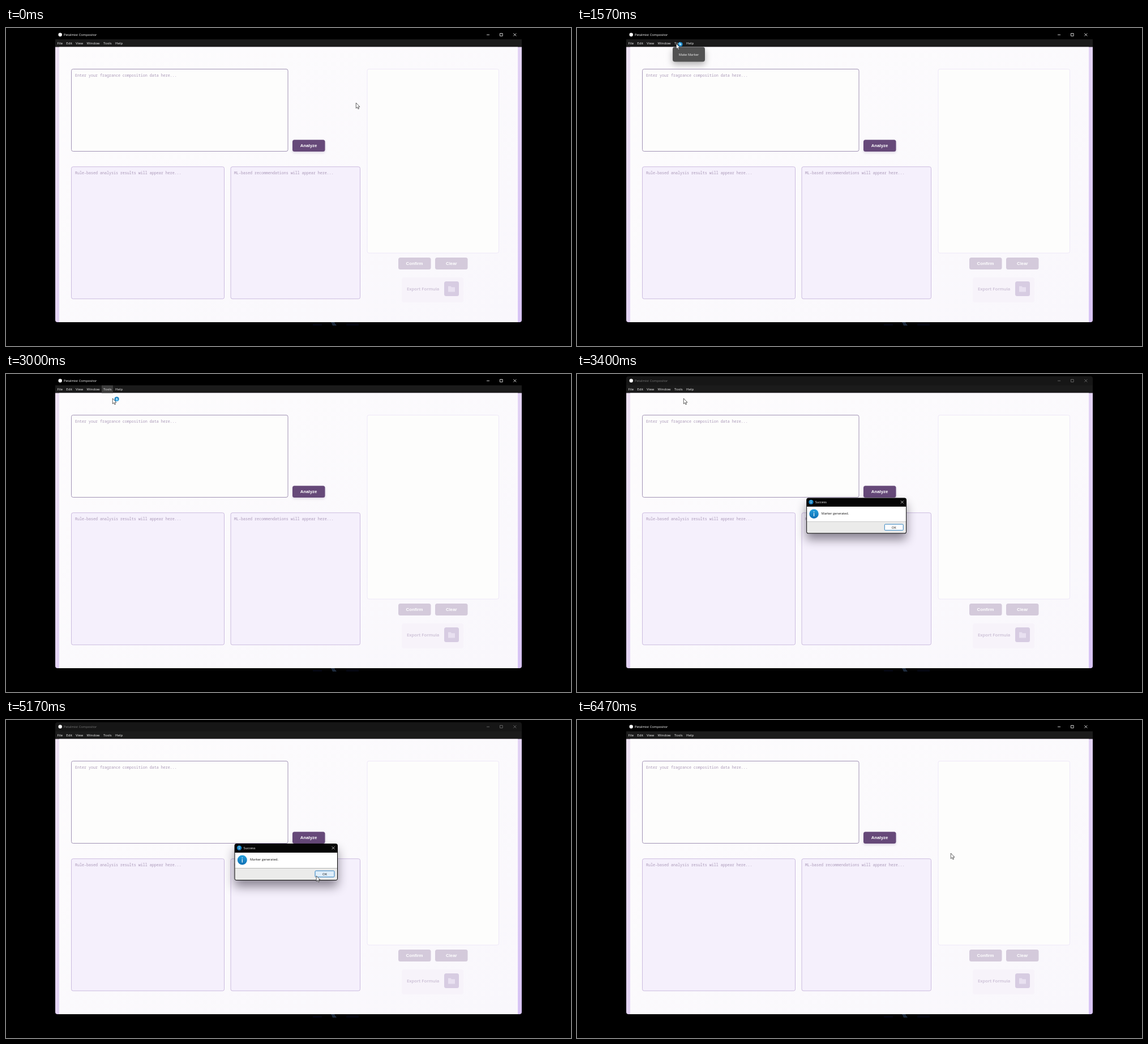
Animation of 998x561 px, one loop 6500 ms. Source, as an HTML page:

```html
<!DOCTYPE html>
<html lang="en">
<head>
<meta charset="utf-8">
<title>Petalmist Compositor</title>
<style>
  html, body { margin: 0; width: 100%; height: 100%; overflow: hidden; background: #000; }
  svg { display: block; width: 100%; height: 100%; }
  text { font-family: "Open Sans", "Noto Sans", sans-serif; font-size: 5.8px; white-space: pre; }
  .menu text { font-size: 6.1px; fill: #f2f2f2; }
  .hint text { font: 6.67px "Noto Sans Mono", "DejaVu Sans Mono", monospace; fill: #aa98b8; }
  .btn text { font: bold 7.8px "Liberation Sans", Arial, sans-serif; fill: #fff; text-anchor: middle; }
  .mid { text-anchor: middle; }
  #analyze { filter: drop-shadow(0 2px 2px rgba(90, 60, 120, .2)); }
  #popup { filter: drop-shadow(0 5px 6px rgba(0, 0, 0, .3)); }
  #dialog { filter: drop-shadow(0 11px 9px rgba(10, 5, 20, .45)); }
</style>
</head>
<body>
<svg viewBox="0 0 998 561">
  <defs>
    <linearGradient id="edge" x2="1" y2="1">
      <stop stop-color="#eee2f4"/><stop offset="1" stop-color="#d8c4f6"/>
    </linearGradient>
    <linearGradient id="card" x2="1" y2="1">
      <stop stop-color="#fdfcfd"/><stop offset="1" stop-color="#f9f7fc"/>
    </linearGradient>
    <linearGradient id="info" x2="0" y2="1">
      <stop stop-color="#26a0dc"/><stop offset="1" stop-color="#0f6fb4"/>
    </linearGradient>
    <clipPath id="frame"><rect x="87" y="4" width="824" height="515" rx="4"/></clipPath>
  </defs>
  <rect width="998" height="561"/>

  <!-- dim desktop remains -->
  <path d="M574 519h6l4 6h-7z" fill="#1d2a3c"/>
  <path d="M542 521h16v4h-16zM601 520h22v5h-22z" fill="#03050f"/>

  <g clip-path="url(#frame)">
    <rect x="87" y="4" width="824" height="16" id="bar"/>
    <rect x="87" y="20" width="824" height="14" fill="#1b1b1b"/>
    <rect x="87" y="33.5" width="824" height="486" fill="url(#edge)"/>
    <rect x="94" y="33.5" width="810" height="486" fill="url(#card)"/>
  </g>
  <circle cx="95.7" cy="11.8" r="3.2" fill="#fff"/>
  <g id="caption">
    <text x="102" y="14" fill="currentColor">Petalmist Compositor</text>
    <path d="M849 12h5M872.5 9.5h4.6v4.6h-4.6zM896.3 9.3l5 5m0-5l-5 5" fill="none" stroke="currentColor" stroke-width=".8"/>
  </g>
  <g class="menu">
    <rect id="hot" x="169" y="20" width="20" height="13.5" fill="#3d3d3d"/>
    <text x="90.5" y="28.6">File</text><text x="106.3" y="28.6">Edit</text>
    <text x="123" y="28.6">View</text><text x="142.5" y="28.6">Window</text>
    <text x="172" y="28.6">Tools</text><text x="193" y="28.6">Help</text>
  </g>

  <rect x="115.5" y="72.5" width="382.5" height="145" rx="3" fill="#fdfdfc" stroke="#a193b5"/>
  <g fill="#f5f0fc" stroke="#cbbbdf">
    <rect x="115.5" y="244.8" width="270" height="233" rx="3"/>
    <rect x="397" y="244.8" width="228.5" height="233" rx="3"/>
  </g>
  <rect x="638" y="72.5" width="232.5" height="324.5" rx="3" fill="#fdfdfc" stroke="#eee8f8"/>
  <g class="hint">
    <text x="122" y="86">Enter your fragrance composition data here...</text>
    <text x="122" y="258">Rule-based analysis results will appear here...</text>
    <text x="403" y="258">ML-based recommendations will appear here...</text>
  </g>
  <g class="btn">
    <rect id="analyze" x="506" y="197.3" width="57.5" height="20.8" rx="3.5" fill="#664979"/>
    <text x="534.6" y="210.4">Analyze</text>
    <g fill="#d4cadb">
      <rect x="693" y="405" width="57.5" height="21" rx="3.5"/>
      <rect x="758" y="405" width="57.5" height="21" rx="3.5"/>
    </g>
    <text x="721.5" y="418.2">Confirm</text>
    <text x="786.8" y="418.2">Clear</text>
  </g>
  <rect x="699" y="440" width="109" height="44" rx="4" fill="#f7f3fa"/>
  <text x="708" y="462.8" style="font-size:7.7px;font-weight:600" fill="#c9bdd3">Export Formula</text>
  <rect x="774" y="447" width="26" height="26" rx="3.5" fill="#d7cce2"/>
  <path d="M781 455.5h4.5l1.5 1.7h6v8.3h-12z" fill="#e8e0f0"/>

  <g id="popup">
    <rect x="169" y="33.5" width="57" height="26" rx="4" fill="#525252"/>
    <rect id="item" x="173" y="37" width="49" height="19" rx="2.5" fill="#666"/>
    <text class="mid" x="197.5" y="49" fill="#f2f2f2">Make Marker</text>
  </g>

  <g id="dialog">
    <rect x="403.5" y="218" width="182.5" height="65" rx="4" fill="#050505"/>
    <path d="M404.5 234h180.5v27.5h-180.5z" fill="#fff"/>
    <path d="M404.5 261.5h180.5v18q0 2.5-2.5 2.5h-175.5q-2.5 0-2.5-2.5z" fill="#ebebea"/>
    <g fill="url(#info)"><circle cx="412" cy="225.7" r="4.2"/><circle cx="417.3" cy="247" r="8.5"/></g>
    <path d="M412 225v3m0-5v1" stroke="#fff" stroke-width=".9"/>
    <path d="M417.3 245.5v6m0-9v1.5" stroke="#fff" stroke-width="1.2"/>
    <text x="419.5" y="228" fill="#fff">Success</text>
    <path d="M575.6 223.2l5 5m0-5l-5 5" stroke="#e8e8e8" stroke-width=".8"/>
    <text x="431" y="248" fill="#111">Marker generated.</text>
    <rect id="ok" x="546" y="266" width="34" height="11" rx="1.5" stroke="#2a7fc1"/>
    <text class="mid" x="563" y="273.7" fill="#111">OK</text>
  </g>

  <g id="cursor">
    <path id="arrow" d="M.3 0v9.6l2.2-2 1.5 3.4 1.5-.7-1.5-3.2h3z" fill="#fff" stroke="#222" stroke-width=".7"/>
    <path id="beam" d="M-1.5-4h3M0-4v8M-1.5 4h3" fill="none" stroke="#222" stroke-width=".9"/>
    <g id="busy">
      <circle cx="7.6" cy="1.3" r="3" fill="#9bdcff" stroke="#137dbe" stroke-width="2"/>
      <path id="spin" d="M7.6-1.7a3 3 0 0 1 3 3" fill="none" stroke="#5fc4f5" stroke-width="1.6"/>
    </g>
  </g>
</svg>
<script>
const LOOP = 6500, OPEN = 3300, CLOSE = 6020;
const $ = id => document.getElementById(id);
const clamp = v => Math.max(0, Math.min(1, v));
const ramp = (t, start, span) => clamp((t - start) / span);
const within = (v, a, b) => v >= a && v < b;
const show = (id, on) => $(id).style.display = on ? '' : 'none';

// time, x, y of the pointer
const path = [
  [0, 618, 132], [30, 618, 132], [680, 358, 80], [1080, 186, 24], [1330, 175, 27.5],
  [2070, 175, 27.5], [2500, 188, 43], [3930, 188, 43], [4270, 343, 160],
  [4580, 486, 262], [4900, 543, 276], [5070, 543, 276], [5400, 559, 272.5],
  [6040, 559, 272.5], [6470, 660, 235], [LOOP, 660, 235]
];

function pointer(t) {
  const i = path.findIndex(p => p[0] > t);
  const [t0, x0, y0] = path[i - 1], [t1, x1, y1] = path[i];
  const k = (t - t0) / (t1 - t0);
  return [x0 + (x1 - x0) * k, y0 + (y1 - y0) * k];
}

function draw(t) {
  const [x, y] = pointer(t);
  const modal = within(t, OPEN, CLOSE);

  $('bar').setAttribute('fill', modal ? '#161616' : '#000');
  $('caption').style.color = modal ? '#777' : '#fff';
  show('hot', within(t, 1700, OPEN));

  $('popup').style.opacity = ramp(t, 1420, 100) * (1 - ramp(t, 2730, 100));
  show('item', y > 36 && t > 2070);

  const grow = 1 - (1 - ramp(t, OPEN, 310)) ** 3;
  const leave = ramp(t, CLOSE, 130);
  const scale = .9 + .1 * grow - .08 * leave;
  $('dialog').style.opacity = ramp(t, OPEN, 90) * (1 - leave);
  $('dialog').setAttribute('transform', `translate(458 236) scale(${scale}) translate(-458 -236)`);
  const hover = within(x, 546, 580) && within(y, 266, 277);
  $('ok').setAttribute('fill', hover ? '#dfeefa' : '#fdfdfd');

  const typing = within(x, 115, 498) && within(y, 72, 218);
  show('arrow', !typing);
  show('beam', typing);
  show('busy', within(t, 1430, OPEN));
  $('cursor').setAttribute('transform', `translate(${x} ${y})`);
  $('spin').setAttribute('transform', `rotate(${t * .4} 7.6 1.3)`);
}

function tick() {
  draw(performance.now() % LOOP);
  requestAnimationFrame(tick);
}
tick();
</script>
</body>
</html>
```
